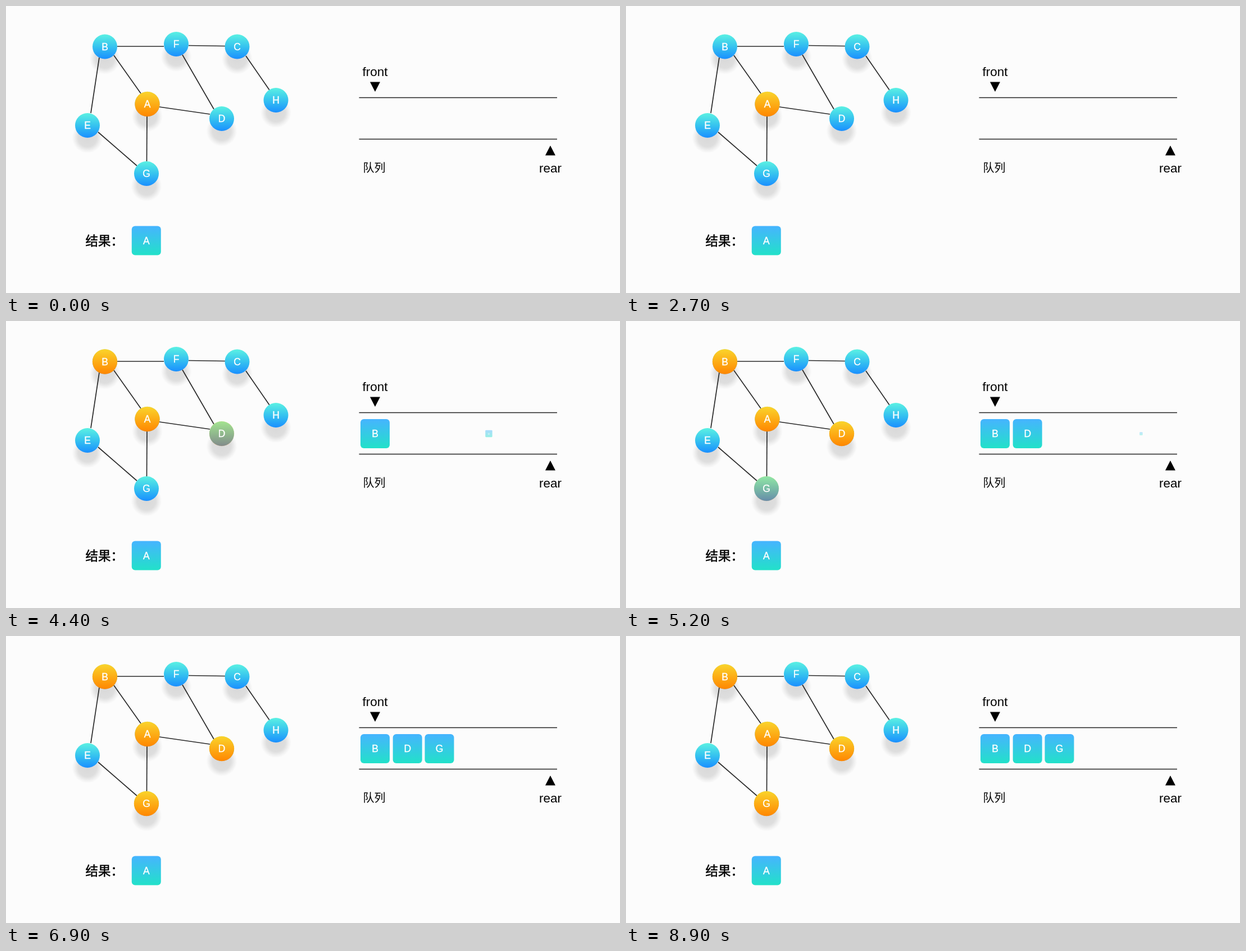
Write an HTML page that moves like this. It is 1093 by 512 pixels and loops after 9 s.

```html
<!DOCTYPE html>
<html lang="zh-CN">
<head>
<meta charset="utf-8">
<title>广度优先遍历</title>
<style>
  html, body { margin: 0; width: 100%; height: 100%; overflow: hidden; background: #fcfcfc; }
  svg { display: block; width: 100%; height: 100%; }
  text { font-family: "Liberation Sans", Arial, sans-serif; }
  .letter { font-size: 17.5px; fill: #fff; stroke: #fff; stroke-width: .35; text-anchor: middle; }
  .label { font-size: 22.5px; text-anchor: middle; }
  .cjk { font-family: "Noto Sans CJK SC", "Noto Sans CJK", sans-serif; }
  .edge { stroke: #2b2b2b; stroke-width: 1.7; }
  .rail { stroke: #222; stroke-width: 1.6; }
</style>
</head>
<body>
<svg viewBox="0 0 1093 512">
  <defs>
    <linearGradient id="blue" x2="0" y2="1">
      <stop stop-color="#5bf1e3"/><stop offset=".5" stop-color="#36c3ef"/><stop offset="1" stop-color="#1a8fff"/>
    </linearGradient>
    <linearGradient id="orange" x2="0" y2="1">
      <stop stop-color="#fad42c"/><stop offset="1" stop-color="#ff8600"/>
    </linearGradient>
    <linearGradient id="tile" x2="0" y2="1">
      <stop stop-color="#46b4ff"/><stop offset="1" stop-color="#22e1c9"/>
    </linearGradient>
    <radialGradient id="shadow">
      <stop stop-opacity=".14"/><stop offset=".6" stop-opacity=".12"/>
      <stop offset=".85" stop-opacity=".04"/><stop offset="1" stop-opacity="0"/>
    </radialGradient>
  </defs>
  <g id="shadows"></g>
  <g id="edges"></g>
  <g id="nodes"></g>
  <path class="rail" d="M628.5 163.5H981M628.5 237.5H981"/>
  <path d="M648 135.5h18l-9 17.5zM960 266.5h18l-9 -17.5z"/>
  <text class="label" x="657" y="125">front</text>
  <text class="label" x="969" y="297">rear</text>
  <text class="cjk" x="635.5" y="296" font-size="20">队列</text>
  <text class="cjk" x="141.5" y="427" font-size="22.5" stroke="#000" stroke-width=".5">结果：</text>
  <g id="tiles"></g>
</svg>
<script>
const LOOP = 9000, STEP = 100, MOVE = 410;
const REAR_X = 969, QUEUE_Y = 201;

const nodes = {
  B: [176, 72.5], F: [303, 68], C: [411.5, 72.5], H: [480.5, 168],
  A: [251.5, 175], D: [384, 201], E: [145, 213], G: [250, 299]
};
const edges = [
  [198, 72, 281, 72], [325, 70.5, 390, 71.5], [427, 89, 469, 150],
  [166, 92, 151, 191], [192, 88, 240, 156], [273, 180, 363, 193],
  [251, 197, 250.5, 277], [164, 225, 233, 285], [314, 87, 370, 184]
];
const arrivals = [
  { name: 'B', start: 3520, x: 657 },
  { name: 'D', start: 4214, x: 714.7 },
  { name: 'G', start: 5062, x: 771.5 }
];

function add(parent, tag, attrs, text) {
  const el = document.createElementNS('http://www.w3.org/2000/svg', tag);
  for (const key in attrs) el.setAttribute(key, attrs[key]);
  if (text) el.textContent = text;
  return parent.appendChild(el);
}
const layer = id => document.getElementById(id);

function addLetter(parent, x, y, name) {
  add(parent, 'text', { class: 'letter', x, y: y + 6.3 }, name);
}
function addTile(name, x, y) {
  const tile = add(layer('tiles'), 'g', { transform: `translate(${x} ${y})` });
  add(tile, 'rect', { x: -26, y: -26, width: 52, height: 52, rx: 6, fill: 'url(#tile)' });
  addLetter(tile, 0, 0, name);
  return tile;
}

for (const [x1, y1, x2, y2] of edges) add(layer('edges'), 'line', { class: 'edge', x1, y1, x2, y2 });

const glow = {};
for (const [name, [cx, cy]] of Object.entries(nodes)) {
  add(layer('shadows'), 'circle', { cx, cy: cy + 22, r: 27.5, fill: 'url(#shadow)' });
  add(layer('nodes'), 'circle', { cx, cy, r: 22, fill: 'url(#blue)' });
  glow[name] = add(layer('nodes'), 'circle', { cx, cy, r: 22.2, fill: 'url(#orange)', opacity: name === 'A' ? 1 : 0 });
  addLetter(layer('nodes'), cx, cy, name);
}
addTile('A', 249.8, 418.5);
for (const item of arrivals) item.tile = addTile(item.name, REAR_X, QUEUE_Y);

function draw(time) {
  for (const { name, start, x, tile } of arrivals) {
    const u = Math.min(1, Math.max(0, (time - start) / MOVE));
    const eased = u * u * (3 - 2 * u);
    const cx = REAR_X + (x - REAR_X) * eased;
    glow[name].setAttribute('opacity', u);
    tile.setAttribute('opacity', u);
    tile.setAttribute('transform', `translate(${cx} ${QUEUE_Y}) scale(${eased ** 1.7})`);
  }
}

const origin = performance.now();
function tick() {
  const time = (performance.now() - origin) % LOOP;
  draw(Math.floor(time / STEP) * STEP);
  requestAnimationFrame(tick);
}
tick();
</script>
</body>
</html>
```
